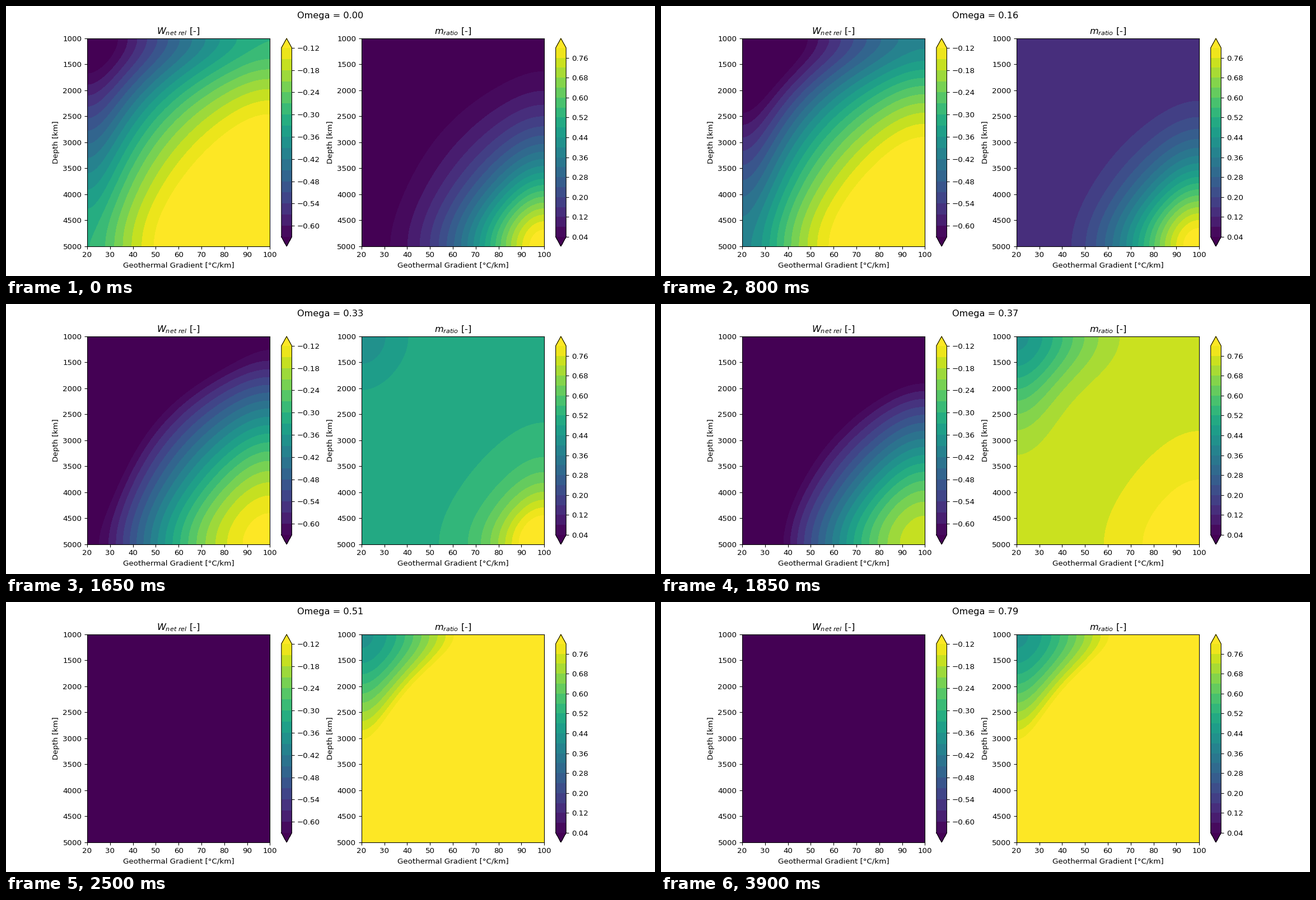
These frames come from a looping animation (1159x483 px, 3950 ms). A matplotlib script:

```python
import numpy as np
import matplotlib.pyplot as plt
from matplotlib.animation import FuncAnimation

WIDTH, HEIGHT, DPI = 1159, 483, 96.6
FRAMES = 79
STEP = 0.8 / 79
SIGMA = 0.12  # blur width as a share of the axis

W_LEVELS = np.round(np.linspace(-0.63, -0.12, 18), 2)
M_LEVELS = np.round(np.linspace(0.04, 0.80, 20), 2)


def blur_matrix(x):
    """Gaussian weights with mirrored ends."""
    weights = sum(np.exp(-((x[:, None] - image) / SIGMA) ** 2 / 2)
                  for image in (x, -x, 2 - x))
    weights[:, [0, -1]] /= 2
    return weights / weights.sum(axis=1, keepdims=True)


unit = np.linspace(0, 1, 100)
gradient = 20 + 80 * unit
depth = 1000 + 4000 * unit
kernel = blur_matrix(unit)


def blur(field):
    return kernel @ field @ kernel.T


raw_temp = np.outer(depth, gradient) / 1000  # temperature rise at depth
temp = blur(raw_temp)
lean = 22 * (unit[None, :] - unit[:, None])


def soft_max(a, b, p):
    return (a**p + b**p) ** (1 / p)


def mass_ratio(omega):
    power_only = 6.92e-6 * np.clip(temp - 79, 0, None) ** 2
    heat_cap = 0.113 + 0.0082 * raw_temp
    base = 0.25759 * omega / max(0.50388 - omega, 0.004)
    base = base * (1 + 1.05e-4 * (temp + lean - 122))
    heat = blur(np.minimum(heat_cap, base))
    return soft_max(power_only, heat, 2 + 35 * omega**3)


def net_work(omega):
    free = 0.975 * np.exp(-temp / 108.6)
    share = omega / max(2.03 - 3.22 * omega - 64 * omega**8, 0.05)
    slack = 0.745 * (temp / 426) ** 3.65
    return -free - (soft_max(share, slack, 2) - slack)


# The small margin keeps the pixel size from rounding down.
fig, axes = plt.subplots(1, 2, dpi=DPI, gridspec_kw={"right": 0.8998},
                         figsize=((WIDTH + 0.01) / DPI, (HEIGHT + 0.01) / DPI))
heading = fig.suptitle("Omega = 0.00")
panels = [
    (axes[0], net_work, W_LEVELS, r"$W_{net\ rel}$ [-]"),
    (axes[1], mass_ratio, M_LEVELS, r"$m_{ratio}$ [-]"),
]


def fill(ax, field, levels, omega):
    return ax.contourf(gradient, depth, field(omega), levels=levels,
                       cmap="viridis", extend="both")


fills = []
for ax, field, levels, title in panels:
    filled = fill(ax, field, levels, 0)
    fills.append(filled)
    fig.colorbar(filled, ax=ax).minorticks_off()
    ax.set_title(title)
    ax.set_xlabel("Geothermal Gradient [°C/km]")
    ax.set_ylabel("Depth [km]")
    ax.set_xlim(20, 100)
    ax.set_ylim(5000, 1000)
    ax.set_xticks(range(20, 101, 10))


def update(frame):
    omega = frame * STEP
    heading.set_text(f"Omega = {omega:.2f}")
    for k, (ax, field, levels, _) in enumerate(panels):
        fills[k].remove()
        fills[k] = fill(ax, field, levels, omega)
    return []


anim = FuncAnimation(fig, update, frames=FRAMES, interval=50, repeat=True,
                     repeat_delay=0, blit=False)
plt.show()
```
